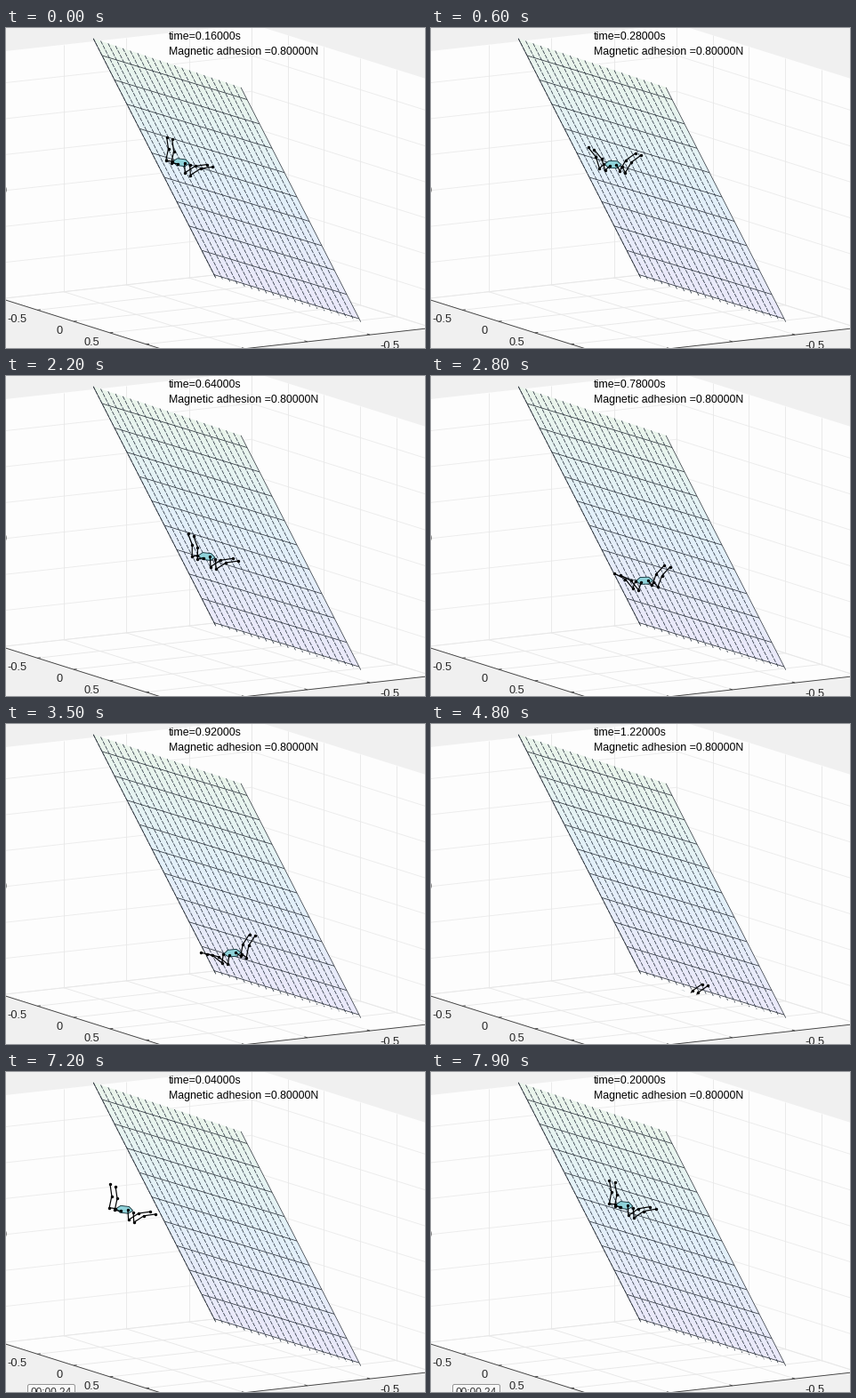
A matplotlib script that plays this animation: 471 by 360 pixels, repeating every 8000 ms.

```python
import numpy as np
import matplotlib.pyplot as plt
from matplotlib.animation import FuncAnimation
from matplotlib.collections import LineCollection
from matplotlib.colors import LinearSegmentedColormap
from matplotlib.patches import FancyBboxPatch, Polygon

W, H, DPI = 471, 360, 100
PX = 72 / DPI
FRAMES, STEP_MS = 80, 100
RESTART = 69
LANDING = 0.2

plt.rcParams["font.family"] = "Liberation Sans"
fig = plt.figure(figsize=(W / DPI, H / DPI), dpi=DPI, facecolor="#f0f0f0")
ax = fig.add_axes([0, 0, 1, 1])
ax.set_xlim(0, W)
ax.set_ylim(H, 0)
ax.axis("off")


def polygon(points, color, z):
    patch = Polygon(points, facecolor=color, edgecolor="none", zorder=z)
    return ax.add_patch(patch)


def segments(lines, color, width, z, style="solid"):
    ax.add_collection(LineCollection(lines, colors=color, linewidths=width * PX,
                                     linestyles=style, zorder=z))


def label(x, y, text, size=12.4, color="black", **kw):
    return ax.text(x, y, text, fontsize=size * PX, color=color, zorder=9, **kw)


# Axes box: projected half-unit steps along x and y, quarter unit along z
LEFT = np.array([-5.3, 304.5])
DX = np.array([40.7, 12.8])
DY = np.array([70.3, -7.8])
DZ = np.array([0, -40.4])
UP = np.array([0, -278.0])
BACK = LEFT + 4 * DY
FRONT = LEFT + 5 * DX
RIGHT = BACK + 5 * DX


def draw_box():
    for a, b in [(LEFT, BACK), (BACK, RIGHT)]:
        polygon([a, b, b + UP, a + UP], "#fdfdfd", 0)
        segments([(a + k * DZ, b + k * DZ) for k in range(7)], "#ececec", 0.9, 1)
    polygon([LEFT, BACK, RIGHT, FRONT], "#fdfdfd", 0)
    for k in range(6):
        foot = BACK + k * DX
        segments([(LEFT + k * DX, foot), (foot, foot + UP)], "#e8e8e8", 0.9, 1)
    for k in range(5):
        foot = LEFT + k * DY
        segments([(foot, foot + 5 * DX), (foot, foot + UP)], "#e8e8e8", 0.9, 1)

    segments([(LEFT, FRONT), (FRONT, FRONT + 4 * DY)], "#404040", 0.9, 2)
    for k in range(1, 5):
        for tick, inward in [(LEFT + k * DX, DY), (FRONT + k * DY, -DX)]:
            segments([(tick, tick + 3.5 * inward / np.hypot(*inward))],
                     "#404040", 0.9, 2)
    style = dict(size=12.8, color="#262626", va="center_baseline")
    for k, text in enumerate(["-0.5", "0", "0.5"], 1):
        x, y = LEFT + k * DX + (-12, 9.3)
        label(x, y, text, ha="right", **style)
    x, y = FRONT + 3 * DY + (11, 11.5)
    label(x, y, "-0.5", **style)
    label(-3, 181, ")", **style)


def on_slope(s, k):
    """Point at fraction s across and k rows down the inclined surface."""
    return 108 + 163 * s + 14 * k, 31 + 49.5 * s + 27.4 * k


def draw_slope():
    top = lambda s: -0.7 + 0.2 * s
    tint = LinearSegmentedColormap.from_list(
        "tint", ["#ebf6ec", "#e6f4f3", "#e3f1fa", "#e7edfb", "#ebe9fa"])
    face = polygon([on_slope(0, top(0)), on_slope(1, top(1)),
                    on_slope(1, 9), on_slope(0, 9)], "none", 3)
    yy, xx = np.mgrid[0:H, 0:W]
    depth = (yy - 12 - 0.3 * (xx - 97)) / 224
    shade = ax.imshow(depth, cmap=tint, vmin=0, vmax=1, zorder=3,
                      extent=(0, W, H, 0), aspect="auto")
    shade.set_clip_path(face)
    rows = [(on_slope(0, k), on_slope(1, k)) for k in range(10)]
    segments(rows, "#2a3038", 0.75, 4)
    ribs = [(on_slope(s, top(s)), on_slope(s, 9.13)) for s in np.linspace(0, 1, 21)]
    segments(ribs[:-1], "#2a3340", 0.75, 4, (0, (6, 1.6)))
    segments([ribs[0], ribs[-1]], "#30363e", 0.7, 4)


def centre_at(t):
    """Fly in, rebound a little, slide down and drop past the lower edge."""
    if t < LANDING:
        return np.array([112 + 530 * t, 156 - 30 * t])
    u = t - LANDING
    y = 150 + 21 * u + 301 * u**2 - 170 * u**3
    x = 208 + 0.53 * (y - 170) + 20 * np.exp(-u / 0.06)
    return np.array([x, y + 900 * max(t - 1.22, 0)])


def leg_shape(lift):
    """Hip, knee, ankle and foot of a right leg; lift runs from flat to raised."""
    hip = np.array([7, 1])
    knee = np.array([9 + 5 * lift, 12 - 11 * lift])
    points = [hip, knee]
    for flat, raised in [(40, 95), (15, 75)]:
        a = np.radians(flat + (raised - flat) * lift)
        points.append(points[-1] + 13.5 * np.array([np.cos(a), -np.sin(a)]))
    return np.array(points)


def robot_at(t):
    """Body outline and four legs; the two sides swing in turn."""
    u = max(t - 0.18, 0)
    swing = np.cos(2 * np.pi * u / 0.46)
    fade = np.exp(-0.5 * u)
    roll = 0.12 * swing
    turn = np.array([[np.cos(roll), np.sin(roll)], [-np.sin(roll), np.cos(roll)]])
    centre = centre_at(t)
    legs = []
    for side in (-1, 1):
        shape = leg_shape(fade * (1 - side * swing) / 2) * (side, 1)
        for depth in (-1, 1):
            legs.append((shape + depth * np.array([3.2, 1])) @ turn + centre)
    a = np.arange(6) * np.pi / 3
    hull = np.c_[9.5 * np.cos(a), 4.5 * np.sin(a)] @ turn + centre
    return hull, legs


def clock(i):
    """Simulation time; the recording starts over near the end of the loop."""
    if i < RESTART:
        return 0.16 + 0.02 * int(1.1 * i + 0.25)
    return 0.02 * int(1.1 * max(i - RESTART - 1, 0) + 0.25)


draw_box()
draw_slope()
time_text = label(183, 12.9, "")
label(183, 29.8, "Magnetic adhesion =0.80000N")

# The robot vanishes once it leaves the lower limit of the axes
floor_y = lambda x: 285 + 0.307 * (x - 235)
visible = polygon([(0, -9), (W, -9), (W, floor_y(W)), (0, floor_y(0))], "none", 0)
body = polygon(np.zeros((6, 2)), "#8fd3da", 6)
body.set(edgecolor="#16333a", linewidth=0.9 * PX)
legs = [ax.plot([], [], "-o", color="black", lw=1.2 * PX, ms=3.4 * PX, mew=0,
                zorder=7)[0] for _ in range(4)]
for part in [body, *legs]:
    part.set_clip_path(visible)

badge = FancyBboxPatch((26, 353), 50, 14, boxstyle="round,pad=1.5,rounding_size=2",
                       facecolor="#f8f8f8", edgecolor="#8c8c8c",
                       linewidth=0.9 * PX, zorder=8)
ax.add_patch(badge)
badge_text = label(51, 359, "00:00.24", 11.9, "#333333",
                   ha="center", va="center_baseline")


def draw(i):
    t = clock(i)
    time_text.set_text(f"time={t:.5f}s")
    hull, chains = robot_at(t)
    body.set_xy(hull)
    for line, chain in zip(legs, chains):
        line.set_data(*chain.T)
    for part in (badge, badge_text):
        part.set_visible(i >= RESTART)
    return [time_text, body, *legs, badge, badge_text]


anim = FuncAnimation(fig, draw, frames=FRAMES, interval=STEP_MS,
                     repeat=True, repeat_delay=0, blit=False)
plt.show()
```
